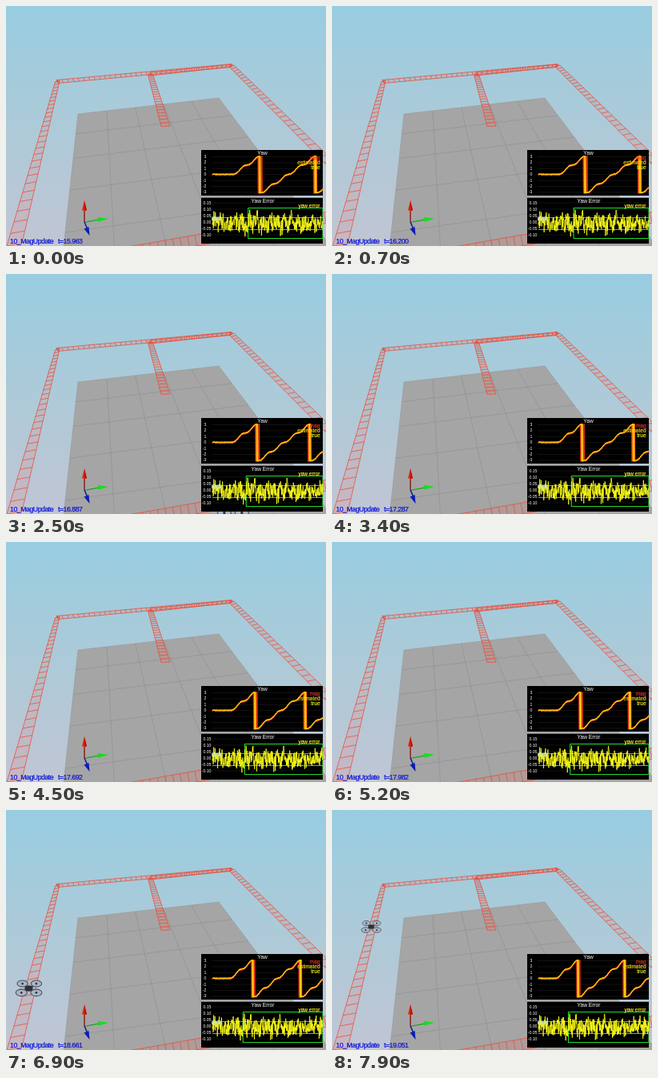
Recreate the animation shown at these times as an HTML page. Size 400 by 300 pixels, loop 8000 ms.

```html
<!DOCTYPE html>
<html lang="en">
<head>
<meta charset="utf-8">
<title>Yaw simulation</title>
<style>
  html, body { margin: 0; width: 100%; height: 100%; overflow: hidden; }
  svg { display: block; width: 400px; height: 300px; }
  text { font-family: "Liberation Sans", Arial, sans-serif; }
  .label { font-size: 8.8px; letter-spacing: -.5px; fill: #0a10d8; stroke: #0a10d8; stroke-width: .2; }
  .small { font-size: 6.6px; }
  .tick { font-size: 5.2px; fill: #fff; text-anchor: end; }
  .key { font-size: 6.5px; text-anchor: end; stroke-width: .15; }
  .mid { text-anchor: middle; fill: #fff; }
  .track { fill: none; stroke: #ea4c38; stroke-width: .75; }
  .line { fill: none; stroke-linejoin: round; }
</style>
</head>
<body>
<svg viewBox="0 0 400 300">
  <defs>
    <linearGradient id="sky" x1="0" y1="0" x2="0" y2="1">
      <stop offset="0" stop-color="#98cde1"/>
      <stop offset=".5" stop-color="#adcad8"/>
      <stop offset="1" stop-color="#c0c5d4"/>
    </linearGradient>
    <clipPath id="plot"><path d="M257 180H396.500V297H257z"/></clipPath>
  </defs>
  <rect width="400" height="300" fill="url(#sky)"/>
  <g id="floor"></g>
  <g id="tracks"></g>

  <g id="axes">
    <path d="M98 270V254" stroke="#8c2018" stroke-width="1.500"/>
    <path d="M98 243L101 255.500H95z" fill="#ee1c0c"/>
    <path d="M98 243L101 255.500H98.500z" fill="#b01008"/>
    <path d="M98 270.300L116 267.200" stroke="#18a820" stroke-width="1.200"/>
    <path d="M128 265.700L114.500 264L115.500 269.800z" fill="#18dc20"/>
    <path d="M98 270L101.500 278" stroke="#101c90" stroke-width="1.500"/>
    <path d="M104.500 287L97.500 278.500L103.500 276z" fill="#0c1cb8"/>
  </g>

  <g id="drone">
    <path d="M-7-4L7 4M7-4L-7 4" stroke="#30343c" stroke-width="1.600"/>
    <g fill="#a9b4c4" stroke="#4a5160" stroke-width=".8">
      <ellipse cx="-6" cy="-4.500" rx="5" ry="3"/>
      <ellipse cx="7" cy="-4.500" rx="5" ry="3"/>
      <ellipse cx="-7" cy="4" rx="5.300" ry="3.200"/>
      <ellipse cx="7" cy="4" rx="5.300" ry="3.200"/>
    </g>
    <g fill="#2c3038">
      <ellipse rx="3.800" ry="2.800"/>
      <circle cx="-6" cy="-4.500" r="1"/><circle cx="7" cy="-4.500" r="1"/>
      <circle cx="-7" cy="4" r="1"/><circle cx="7" cy="4" r="1"/>
    </g>
  </g>

  <text class="label" x="5" y="297.300">10_MagUpdate</text>
  <text class="label" x="65" y="297.300" id="clock"></text>

  <path d="M244 180H396V237H244zM244 239.800H396V297H244z" fill="#000"/>
  <g id="ticks"></g>
  <g clip-path="url(#plot)">
    <path id="mag" class="line" stroke="#e03018" stroke-width="1.100"/>
    <path id="est" class="line" stroke="#ffa800" stroke-width="1.100"/>
    <path id="true" class="line" stroke="#ffe820" stroke-width=".9"/>
    <path id="bound" class="line" stroke="#20d828" stroke-width="1.100"/>
    <path id="err" class="line" stroke="#fbfb18" stroke-width=".85"/>
    <path d="M257 263.500H269.500V268H257z" fill="#c8e8b8" opacity=".8"/>
  </g>
  <text class="small mid" x="320.500" y="186">Yaw</text>
  <text class="small mid" x="321" y="246.300">Yaw Error</text>
  <text class="key" x="392.500" y="191.800" fill="#f03420" stroke="#f03420">mag</text>
  <text class="key" x="392.500" y="197.600" fill="#ffd800" stroke="#ffd800">estimated</text>
  <text class="key" x="392.500" y="203.500" fill="#f0ff20" stroke="#f0ff20">true</text>
  <text class="key" x="392.500" y="251.500" fill="#ffff20" stroke="#ffff20">yaw error</text>
</svg>
<script>
const $ = id => document.getElementById(id);
const LOOP = 8000, STEP = 100;
// play time in ms, simulated time in s
const CLOCK = [[0, 15.963], [1300, 16.403], [2500, 16.887], [3400, 17.287],
  [4500, 17.692], [5900, 18.272], [7900, 19.051]];

const mix = (a, b, u) => a + (b - a) * u;
const mixPt = (a, b, u) => [mix(a[0], b[0], u), mix(a[1], b[1], u)];
const path = pts => 'M' + pts.map(p => p[0].toFixed(2) + ' ' + p[1].toFixed(2)).join('L');

function add(parent, tag, attrs, text) {
  const el = document.createElementNS('http://www.w3.org/2000/svg', tag);
  for (const k in attrs) el.setAttribute(k, attrs[k]);
  if (text) el.textContent = text;
  $(parent).append(el);
}

// Scene: the floor is a plane seen in perspective
const VANISH = [114, -87];
function floorPt(u, v) {
  const a = 1 - v, b = 1.03 * v, c = -.1 * u, w = a + b + c;
  return [(a * 90 + b * 266 + c * VANISH[0]) / w, (a * 135 + b * 115 + c * VANISH[1]) / w];
}
function drawFloor() {
  const far = 5.5, cols = 5;
  add('floor', 'path', {
    d: path([floorPt(0, 0), floorPt(0, 1), floorPt(far, 1), floorPt(far, 0)]) + 'z',
    fill: '#a5a5a5', stroke: '#979898', 'stroke-width': .6
  });
  let d = '';
  for (let i = 1; i < cols; i++) d += path([floorPt(0, i / cols), floorPt(far, i / cols)]);
  for (let i = 1; i < 6; i++) d += path([floorPt(i, 0), floorPt(i, 1)]);
  add('floor', 'path', { d, stroke: '#929393', 'stroke-width': .8 });
}

// Two rails with rungs; k is the depth ratio between start and end
function ladder(a0, a1, b0, b1, k, n) {
  let d = path([a0, a1]) + path([b0, b1]);
  for (let i = 0; i <= n; i++) {
    const u = i / n, s = u / ((1 - u) * k + u);
    d += path([mixPt(a0, a1, s), mixPt(b0, b1, s)]);
  }
  add('tracks', 'path', { d: path([a0, a1, b1, b0]) + 'z', fill: '#f06050', opacity: .13 });
  add('tracks', 'path', { d, class: 'track' });
}
function drawTracks() {
  ladder([63, 92.5], [282, 72.5], [65, 96.5], [281, 76.5], .95, 34);
  ladder([180, 83], [282, 73], [181, 87], [281, 76], .95, 17);
  ladder([61.5, 95], [1, 300], [67, 94], [20, 296.5], 2.14, 27);
  ladder([279, 76], [406, 204], [285, 74], [418, 202], 1.75, 27);
  ladder([177.5, 86], [194, 150.5], [183.5, 85.5], [205, 150], 1.5, 21);
  ladder([420, 254], [5, 327], [424, 267], [6, 341], 1.2, 45);
  for (const [x, y] of [[64.5, 94], [180, 85.5], [281, 74.5]])
    add('tracks', 'path', { d: `M${x - 3} ${y + 1}l6-2m-5-1l4 4m-2-4v4`, class: 'track' });
}

// Plots
const LEFT = 258, WIDTH = 138, DT = .035;
const yawY = v => 210.7 - v * 7.4;
const errY = v => 270 - v * 160;

function drawTicks() {
  for (let v = -3; v <= 3; v++) {
    const y = yawY(v);
    add('ticks', 'path', { d: `M257 ${y}H396`, stroke: '#262626', 'stroke-width': .5 });
    add('ticks', 'text', { x: 250.5, y: y + 1.5, class: 'tick' }, String(v));
  }
  for (let i = -2; i <= 3; i++) {
    const v = i * .05, y = errY(v);
    add('ticks', 'path', { d: `M257 ${y}H396`, stroke: '#262626', 'stroke-width': .5 });
    add('ticks', 'text', { x: 256.5, y: y + 1.8, class: 'tick' }, v.toFixed(2));
  }
}

function noise(i, seed) {
  const r = Math.sin(i * 127.1 + seed * 311.7) * 43758.5453;
  return (r - Math.floor(r)) * 2 - 1;
}
// Staircase turn: one quarter per side of the square
function yaw(t) {
  if (t < 2.9) return 0;
  const v = .78 * (t - 2.97) - .18 * Math.sin(2 * Math.PI * (t - 7) / 2.015);
  return Math.max(0, v);
}
function wrap(v) {
  const turn = 2 * Math.PI;
  return v - turn * Math.floor((v + Math.PI) / turn);
}
const SERIES = {
  mag: (t, i) => yawY(wrap(yaw(t) + .17 * noise(i, 1))),
  est: (t, i) => yawY(wrap(yaw(t) + .05 + .07 * noise(i, 2))),
  true: t => yawY(wrap(yaw(t) + .04)),
  err: (t, i) => errY(.05 * noise(i, 3) + .06 * noise(i, 4) * Math.abs(noise(i, 5))
    + .022 * Math.sin(t * 6.2) + .012 * Math.sin(t * 2.3) - .006)
};

function drawPlots(now) {
  const toX = t => LEFT + t / now * WIDTH;
  for (const id in SERIES) {
    const pts = [];
    for (let i = 0; i * DT <= now; i++) pts.push([toX(i * DT), SERIES[id](i * DT, i)]);
    $(id).setAttribute('d', path(pts));
  }
  const jump = toX(5.17).toFixed(2);
  $('bound').setAttribute('d', `M${LEFT} 264.500H396M${LEFT} 279.500H396M${jump} 252.500H396V290.500H${jump}z`);
}

// The drone runs left past the near side, then away along the left side
function dronePos(now) {
  if (now < 17.8) {
    const x = 283 - 200 * (now - 16.887);
    return [x, 306 - .18 * (x - 283)];
  }
  const u = (now - 18.37) / (19.051 - 18.37);
  const y = 1 / mix(1 / 412, 1 / 233, Math.max(0, u)) + VANISH[1];
  return [49 - .265 * (y - 146), y];
}
function drawDrone(now) {
  const [x, y] = dronePos(now);
  $('drone').setAttribute('transform', `translate(${x} ${y}) scale(${(y - VANISH[1]) / 233})`);
}

function simTime(ms) {
  let i = 1;
  while (i < CLOCK.length - 1 && ms > CLOCK[i][0]) i++;
  const [a, ta] = CLOCK[i - 1], [b, tb] = CLOCK[i];
  return mix(ta, tb, (ms - a) / (b - a));
}

let shown = -1;
const start = performance.now();
function frame() {
  const ms = Math.floor((performance.now() - start) % LOOP / STEP) * STEP;
  if (ms !== shown) {
    shown = ms;
    const now = simTime(ms);
    $('clock').textContent = 't=' + now.toFixed(3);
    drawPlots(now);
    drawDrone(now);
  }
  requestAnimationFrame(frame);
}

drawFloor();
drawTracks();
drawTicks();
frame();
</script>
</body>
</html>
```
